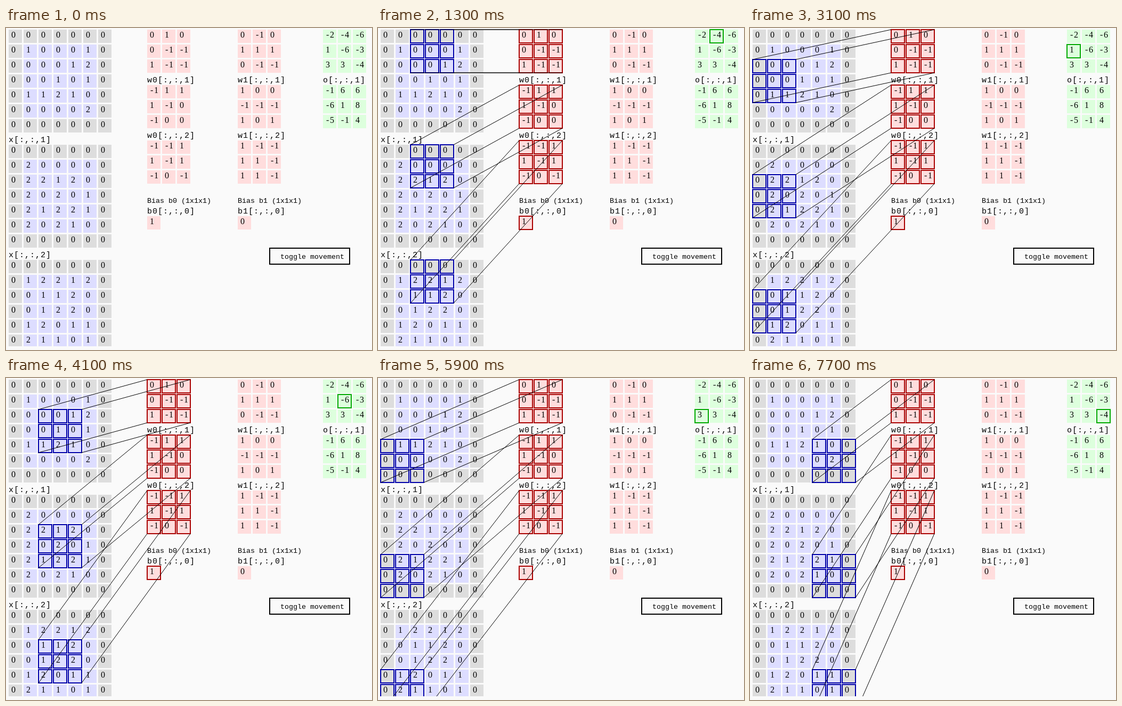
An HTML page that plays this animation: 687x604 px, repeating every 8 s.

```html
<!DOCTYPE html>
<html lang="en">
<head>
<meta charset="utf-8">
<title>Convolution demo</title>
<style>
  html, body { margin: 0; width: 100%; height: 100%; overflow: hidden; background: #fafafa; }
  svg { display: block; width: 687px; height: 604px; }
  text { white-space: pre; }
  .num { font: 16px "Liberation Serif", serif; }
  .label { font: 15px "Liberation Mono", monospace; letter-spacing: 1px; }
  .note { font: 13.333px "Liberation Mono", monospace; }
  .mark { fill: none; stroke-width: 2; }
  .link { stroke: #000; stroke-width: 1; }
</style>
</head>
<body>
<svg id="stage" viewBox="0 0 687 604">
  <defs><clipPath id="view"><rect width="687" height="597"/></clipPath></defs>
  <g id="demo" clip-path="url(#view)"></g>
</svg>
<script>
const NS = "http://www.w3.org/2000/svg";
const PITCH = 28, CELL = 25, SPAN = 2 * PITCH + CELL, LOOP = 8000;
const STEPS = [400, 1300, 2200, 3100, 4100, 5000, 5900, 6800, 7700];
const X_LEFT = 5, W_LEFT = 265, O_LEFT = 595;
const X_TOPS = [3, 219, 435], W_TOPS = [3, 107, 211], BIAS_TOP = 353;
const demo = document.getElementById("demo");

function add(parent, tag, attrs, content) {
  const el = document.createElementNS(NS, tag);
  for (const key in attrs) el.setAttribute(key, attrs[key]);
  if (content !== undefined) el.textContent = content;
  parent.appendChild(el);
  return el;
}

function write(cls, x, y, content) {
  add(demo, "text", { class: cls, x, y }, content);
}

function box(parent, x, y, attrs) {
  return add(parent, "rect", { x, y, width: CELL, height: CELL, ...attrs });
}

function grid(left, top, cols, values, fill) {
  values.forEach((value, i) => {
    const c = i % cols, r = Math.floor(i / cols);
    const x = left + c * PITCH, y = top + r * PITCH;
    box(demo, x, y, { fill: fill(r, c) });
    const at = value[0] === "-" ? `${x + 6} ${x + 13}` : x + 5;
    write("num", at, y + 15, value);
  });
}

function padded(rows) {
  const edge = "0000000";
  return [...(edge + rows.split(" ").map(row => `0${row}0`).join("") + edge)];
}

const inputFill = (r, c) => r % 6 && c % 6 ? "#ddf" : "#ddd";
const red = () => "#fdd", green = () => "#dfd";

[
  "10001 00012 00101 11210 00002",
  "20000 22120 20201 21221 20210",
  "12212 01120 01220 12011 21101"
].forEach((rows, i) => {
  grid(X_LEFT, X_TOPS[i], 7, padded(rows), inputFill);
  if (i) write("label", X_LEFT, X_TOPS[i] - 5, `x[:,:,${i}]`);
});

function stack(name, left, layers, fill) {
  layers.forEach((layer, i) => {
    grid(left, W_TOPS[i], 3, layer.split(" "), fill);
    if (i) write("label", left, W_TOPS[i] - 5, `${name}[:,:,${i}]`);
  });
}

stack("w0", W_LEFT, ["0 1 0 0 -1 -1 1 -1 -1", "-1 1 1 1 -1 0 -1 0 0", "-1 -1 1 1 -1 1 -1 0 -1"], red);
stack("w1", 435, ["0 -1 0 1 1 1 0 -1 -1", "1 0 0 -1 -1 -1 1 0 1", "1 -1 -1 1 1 -1 1 1 -1"], red);
stack("o", O_LEFT, ["-2 -4 -6 1 -6 -3 3 3 -4", "-1 6 6 -6 1 8 -5 -1 4"], green);

[[W_LEFT, "1"], [435, "0"]].forEach(([left, value], i) => {
  write("note", left, 328, `Bias b${i} (1x1x1)`);
  write("label", left, 348, `b${i}[:,:,0]`);
  grid(left, BIAS_TOP, 1, [value], red);
});

add(demo, "rect", { class: "mark", x: 495, y: 413, width: 150, height: 30, stroke: "#000" });
write("note", 515, 433, "toggle movement");

// Highlights: fixed filter marks, a moving input window, one output cell and the links.
const overlay = add(demo, "g", {});
const mark = (parent, x, y, stroke) => box(parent, x, y, { class: "mark", stroke });

function markBlock(parent, left, top, stroke) {
  for (let i = 0; i < 9; i++) {
    mark(parent, left + i % 3 * PITCH, top + Math.floor(i / 3) * PITCH, stroke);
  }
}

const inputWindow = add(overlay, "g", {});
X_TOPS.forEach(top => markBlock(inputWindow, X_LEFT, top, "#00a"));
W_TOPS.forEach(top => markBlock(overlay, W_LEFT, top, "#a00"));
mark(overlay, W_LEFT, BIAS_TOP, "#a00");
const output = mark(overlay, O_LEFT, 3, "#0a0");

const links = [];
X_TOPS.forEach((top, i) => {
  for (const dx of [0, SPAN]) for (const dy of [0, SPAN]) {
    const el = add(overlay, "line", { class: "link", x2: W_LEFT + dx, y2: W_TOPS[i] + dy });
    links.push({ el, x: X_LEFT + dx, y: top + dy });
  }
});

function render(time) {
  const step = STEPS.filter(start => time >= start).length - 1;
  overlay.setAttribute("visibility", step < 0 ? "hidden" : "visible");
  if (step < 0) return;
  const col = step % 3, row = Math.floor(step / 3);
  const dx = col * 2 * PITCH, dy = row * 2 * PITCH;
  inputWindow.setAttribute("transform", `translate(${dx} ${dy})`);
  output.setAttribute("x", O_LEFT + col * PITCH);
  output.setAttribute("y", 3 + row * PITCH);
  for (const { el, x, y } of links) {
    el.setAttribute("x1", x + dx);
    el.setAttribute("y1", y + dy);
  }
}

const begin = performance.now();
function tick() {
  render((performance.now() - begin) % LOOP);
  requestAnimationFrame(tick);
}
tick();
</script>
</body>
</html>
```
